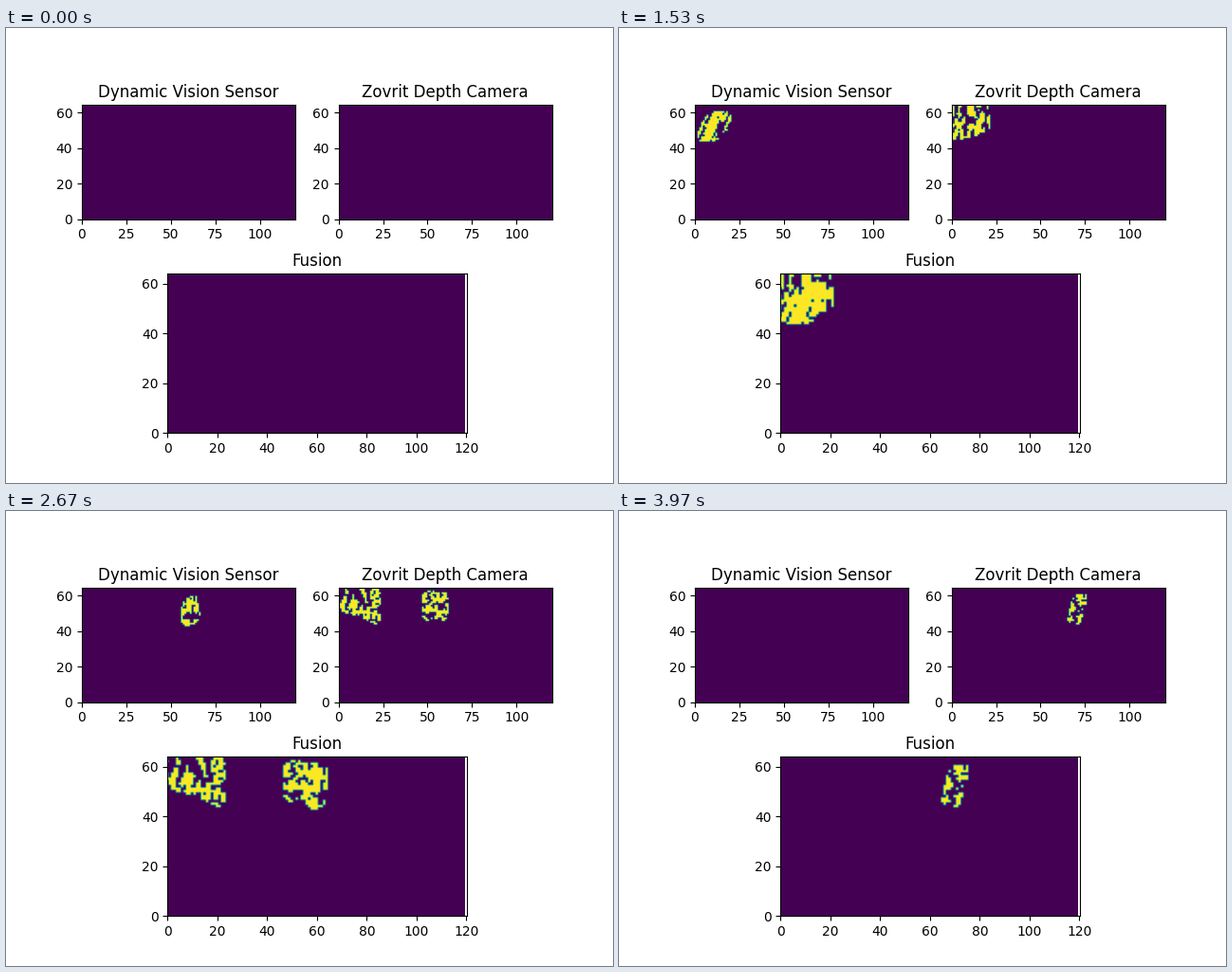
A matplotlib script that plays this animation: 640 by 480 pixels, repeating every 4010 ms.

```python
import numpy as np
import matplotlib.pyplot as plt
from matplotlib.animation import FuncAnimation

W, H = 120, 64
FRAMES, LOOP = 120, 4010
X, Y = np.meshgrid(np.arange(W), np.arange(H))


def ramp(t, start, end):
    """Smooth step from 0 to 1."""
    u = np.clip((t - start) / (end - start), 0, 1)
    return u * u * (3 - 2 * u)


def grain(seed, tall=1, wide=1):
    """Noise spread evenly over 0..1, stretched into small strokes."""
    n = np.random.default_rng(seed).random((H, W))
    n = sum(np.roll(n, (i, j), (0, 1)) for i in range(tall) for j in range(wide))
    return n.ravel().argsort().argsort().reshape(H, W) / n.size


def blob(u, v, power):
    return np.abs(u) ** power + np.abs(v) ** power < 1


def walk(t):
    """Runs in to the left, then comes back and slows down."""
    if t < 1550:
        return max(11, 132 - 0.107 * t)
    return 11 + 65 * np.sin(np.pi / 2 * min((t - 1550) / 1950, 1))


def stray(t):
    """Short vertical flecks that flash near the left edge."""
    if not 400 < t < 2300:
        return np.zeros((H, W), bool)
    rng = np.random.default_rng(int(t // 260))
    x, y, size = rng.integers((3, 42, 1), (16, 54, 5))
    return (X == x) & (Y >= y) & (Y < y + size)


def events(frame, t):
    """Event image, and the part of it that reaches the fusion."""
    if t < 60:
        return np.zeros((2, H, W), bool)
    run = 1 - ramp(t, 1000, 1500)
    slow = ramp(t, 2300, 3100)
    cx = walk(t)
    cy = 45.5 + 6.5 * ramp(t, 570, 1500) - 2.5 * slow
    w = 8 + 7 * run - 6.5 * slow
    h = 9 - 2.5 * run - 2 * slow
    turn = np.exp(-((t - 1530) / 250) ** 2)
    shear = (1 - run) * (0.1 + 0.35 * turn + 0.17 * slow)
    period = 3.5 + 4.5 * run

    v = (Y - cy) / h
    s = X - cx - shear * (Y - cy)
    phase = (s + w - 5 * run * v ** 2) % period
    stripe = np.where(phase < 0.55 * period, 0.85, 0.15) * (1 - 0.2 * s / w)
    core = np.abs(s + 1.5) < 3 * (1 - run) * (1 - slow)
    density = np.where(core, 0.88, 0.92 * stripe) * (1 - ramp(t, 3300, 3750))
    noise = np.roll(grain(500 + frame // 2, 3, 2), int(cx), 1)
    img = blob(s / w, v, 2.6) & (noise < density)

    # the leading edge does not reach the fusion
    kept = s > 6 * run - w if t < 1550 else s < w - 4 * (1 - slow)
    return img | stray(t), img & kept


def standing(t):
    """Still patch on the right and the marks at the left edge."""
    img = np.zeros((H, W), bool)
    if 90 <= t < 1180:
        band = np.abs(Y - 46 - 0.45 * (X - 94)) < 3.6
        dens = np.where(X < 100, 0.6, 0.12)
        img |= band & (X >= 88) & (X < 107) & (grain(7, 1, 2) < dens)
        img |= (X == 88) & (Y >= 40) & (Y < 44)
    if 90 <= t < 1400:
        img |= (X == 1) & (Y >= 59)
        img |= (X < 2) & (Y == 54) | (X == 2) & (Y == 55)
    return img


def scene(t):
    """Textured area that opens at the left and thins out again."""
    grow = ramp(t, 1100, 1450)
    thin = ramp(t, 2300, 3100)
    right = 22 * grow + 2 * ramp(t, 1600, 2200)
    low = 45 + 11 * thin
    tilt = 5 - 13 * ramp(t, 1500, 2900)
    floor = low + tilt * np.clip((X - 6) / 16, 0, 1) ** 1.5
    dens = grow * (0.56 - 0.2 * thin) * (1 - ramp(t, 3150, 3480))
    dens = dens * np.where(Y > 57, 0.65, 1)
    return (X < right) & (Y >= floor) & (grain(40 + int(t // 130), 4, 2) < dens)


def walker(t):
    """Body seen by depth, with a sparse trail behind it."""
    cx = min(43.5 + 0.025 * (t - 2230), 74) - 4 * ramp(t, 3500, 3970)
    cy = 54.5 - 2.7 * ramp(t, 2230, 3300)
    w = 5.5 + 3.3 * ramp(t, 2230, 3000) - 4.6 * ramp(t, 3500, 3950)
    s = X - cx - 0.27 * ramp(t, 3000, 3950) * (Y - cy)
    noise = np.roll(grain(90 + int(t // 100), 2, 2), int(cx), 1)
    body = blob(s / w, (Y - cy) / 8.5, 5) & (noise < 0.6)
    gap = (X > 20) & (X < cx - 4) & (Y > 42)
    trail = 0.17 * (1 - ramp(t, 2200, 2700))
    return body | gap & (grain(160 + int(t // 130), 4, 1) < trail)


def depth(t):
    img = standing(t) | scene(t)
    return img | walker(t) if t > 1750 else img


fig = plt.figure(figsize=(6.4, 4.8), dpi=100)


def panel(pos, title, step):
    ax = fig.add_subplot(*pos)
    ax.set_title(title)
    im = ax.imshow(np.zeros((H, W)), vmin=0, vmax=1, cmap="viridis", origin="lower")
    # the small margin settles which pixel the side borders snap to
    ax.set_xlim(0, W + 0.02)
    ax.set_ylim(0, H)
    ax.set_xticks(range(0, W + 1, step))
    ax.set_yticks(range(0, H, 20))
    return im


dvs = panel((2, 2, 1), "Dynamic Vision Sensor", 25)
cam = panel((2, 2, 2), "Zovrit Depth Camera", 25)
fused = panel((2, 1, 2), "Fusion", 20)


def update(frame):
    t = frame * LOOP / FRAMES
    seen, passed = events(frame, t)
    near = depth(t)
    dvs.set_data(seen.astype(float))
    cam.set_data(near.astype(float))
    fused.set_data((passed | near).astype(float))
    return dvs, cam, fused


anim = FuncAnimation(fig, update, frames=FRAMES, interval=LOOP / FRAMES,
                     repeat=True, repeat_delay=0, blit=False)
plt.show()
```
